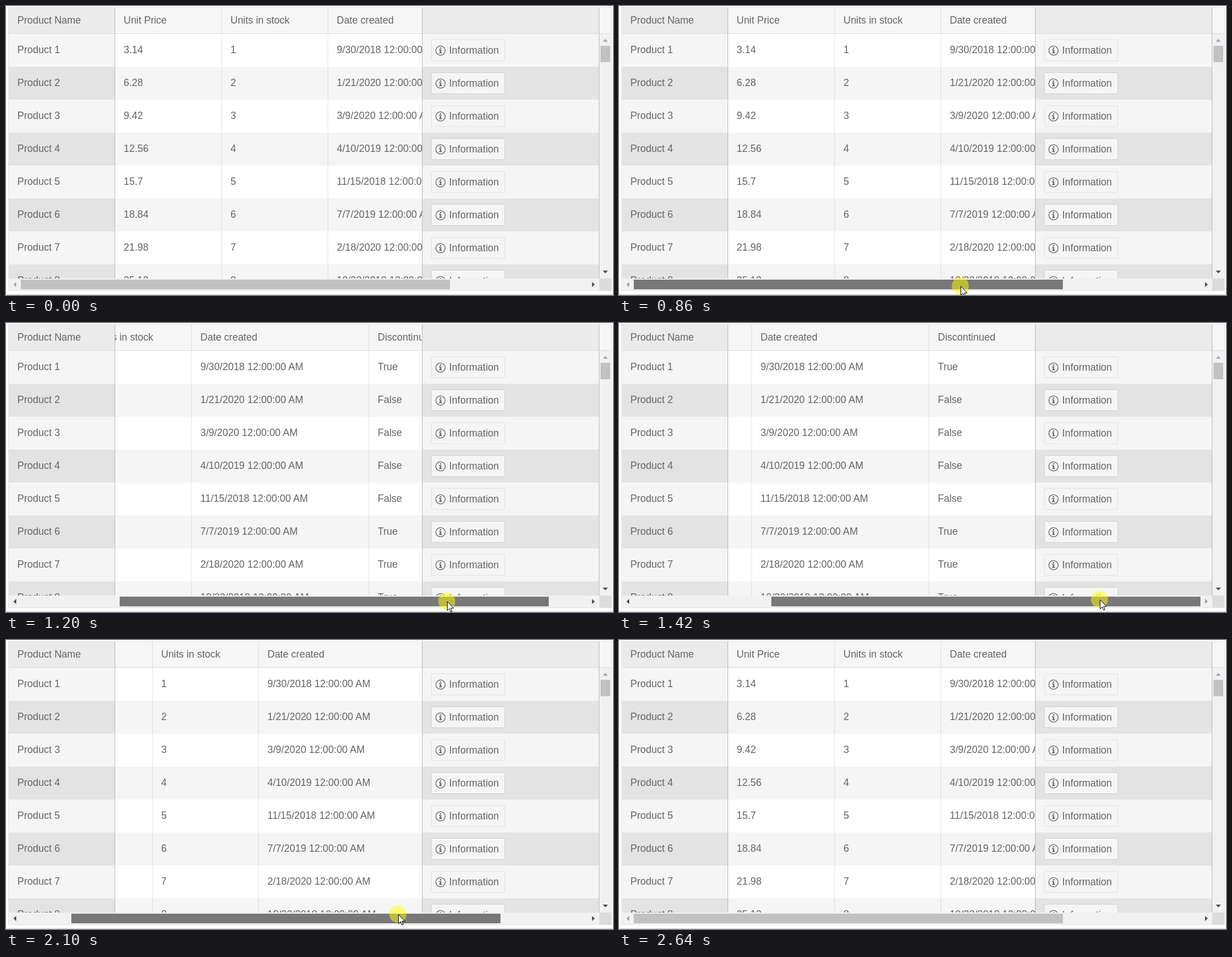
Write an HTML page that moves like this. It is 1068 px wide and 509 px high and loops after 2.73 s.

```html
<!DOCTYPE html>
<html lang="en">
<head>
<meta charset="utf-8">
<title>Grid with locked columns</title>
<style>
  html, body { margin: 0; width: 100%; height: 100%; overflow: hidden; background: #fff; }
  svg { display: block; }
  text { font: 17.5px "Liberation Sans", Arial, sans-serif; fill: #656565; white-space: pre; }
</style>
</head>
<body>
<svg id="stage" width="1068" height="509" viewBox="0 0 1068 509"></svg>
<script>
const LOOP = 2730;
const ROW = 58, BODY_TOP = 49, BODY_BOTTOM = 480;
const MAX_SCROLL = 333, MAX_THUMB = 242, GRAB_X = 601;
const PRESS = 860, RELEASE = 2540, LEAVE = 2640;

const created = ['9/30/2018', '1/21/2020', '3/9/2020', '4/10/2019',
                 '11/15/2018', '7/7/2019', '2/18/2020', '10/22/2018'];
const discontinued = [1, 0, 0, 0, 0, 1, 1, 1];

// Pointer positions, each held until the next: time, x, y
const pointer = [
  [310, 602, 498], [430, 601, 493], [980, 613, 493], [1090, 692, 491],
  [1200, 776, 490], [1320, 817, 488], [1420, 846, 487], [1540, 868, 485],
  [1640, 882, 481], [1760, 891, 478], [1860, 895, 477], [1980, 848, 480],
  [2090, 690, 483], [2200, 592, 478], [2320, 591, 475], [2420, 590, 472]
];

const rect = (x, y, w, h, fill, extra = '') =>
  `<rect x="${x}" y="${y}" width="${w}" height="${h}" fill="${fill}" ${extra}/>`;
const label = (x, y, words) => `<text x="${x}" y="${y}">${words}</text>`;
const arrow = (id, d, fill) => `<path id="${id}" d="${d}" fill="${fill}"/>`;
const eachRow = draw => created.map((_, i) => draw(i, BODY_TOP + i * ROW)).join('');
const stripes = (x, w, odd, even) =>
  eachRow((i, y) => rect(x, y, w, ROW, i % 2 ? even : odd));

const button = y => `<g transform="translate(748 ${y + 10})">
  ${rect(1, 1, 128, 36, '#f5f5f5')}
  <rect x=".5" y=".5" width="129" height="37" rx="1.5" fill="none" stroke="#000" stroke-opacity=".08"/>
  <circle cx="16.5" cy="19.5" r="8.2" fill="none" stroke="#656565" stroke-width="1.3"/>
  <path d="M15.3 14h2.4v2.2h-2.4zM14 17.6h3.7v5.2h1.3v1.4h-5v-1.4h1.4v-3.8H14z" fill="#656565"/>
  ${label(31.7, 25, 'Information')}</g>`;

const lockedLeft = rect(5, 3, 186, 45, '#ebebeb') + stripes(5, 186, '#f5f5f5', '#e3e3e3') +
  label(20, 31, 'Product Name') + eachRow((i, y) => label(20, y + 34, `Product ${i + 1}`));

const lockedRight = rect(733, 3, 310, 45, '#ebebeb') +
  stripes(733, 310, '#f5f5f5', '#e3e3e3') + eachRow((i, y) => button(y));

const columns = [
  [207, 'Unit Price', i => +(3.14 * (i + 1)).toFixed(2)],
  [395, 'Units in stock', i => i + 1],
  [582, 'Date created', i => created[i] + ' 12:00:00 AM'],
  [894, 'Discontinued', i => discontinued[i] ? 'True' : 'False']
].map(([x, title, value]) =>
  label(x, 31, title) + eachRow((i, y) => label(x, y + 34, value(i)))).join('');
const separators = [379, 566, 878].map(x =>
  rect(x, 3, 1, 477, '#000', 'fill-opacity=".1"')).join('');

document.getElementById('stage').innerHTML = `
  <clipPath id="gridClip">${rect(4, 2, 1062, BODY_BOTTOM - 2, '#000')}</clipPath>
  <clipPath id="middleClip">${rect(192, 2, 540, BODY_BOTTOM - 2, '#000')}</clipPath>
  <g clip-path="url(#gridClip)">
    ${rect(192, 3, 540, 45, '#f6f6f6')}
    ${stripes(192, 540, '#fff', '#f5f5f5')}
    <g clip-path="url(#middleClip)"><g id="content">${columns}${separators}</g></g>
    ${lockedLeft}${lockedRight}
    ${rect(1044, 3, 21, 45, '#f6f6f6')}
    ${rect(4, 48, 1062, 1, '#dcdcdc')}
    ${[191, 732, 1043].map(x => rect(x, 3, 1, 477, '#b8b8b8')).join('')}
  </g>
  ${rect(1044, 49, 21, 431, '#f1f1f1')}
  ${rect(1046, 70, 17, 29, '#c1c1c1')}
  ${arrow('up', 'M1050 63h9l-4.5-5z', '#a0abb3')}
  ${arrow('down', 'M1050 466h9l-4.5 5z', '#505050')}
  ${rect(5, 480, 1039, 21, '#f1f1f1')}
  ${rect(1044, 480, 21, 21, '#dcdcdc')}
  ${rect(26, 482, 755, 17, '#c1c1c1', 'id="thumb"')}
  ${arrow('left', 'M18 486v9l-5-4.5z', '#a3a3a3')}
  ${arrow('right', 'M1031 486v9l5-4.5z', '#505050')}
  <rect x="4.5" y="2.5" width="1061" height="499" fill="none" stroke="#e4e4e4"/>
  ${rect(0, 508, 1068, 1, '#c9c9c9')}
  <g id="pointer">
    <circle id="halo" cx="-.5" r="15" fill="#ff0" fill-opacity=".5"/>
    <path d="M.5.5V16.5L4.2 13 6.8 18.8 9 17.8 6.5 12.2H11.5Z" fill="#fff" stroke="#000"/>
  </g>`;

const [content, thumb, left, right, cursor, halo] =
  ['content', 'thumb', 'left', 'right', 'pointer', 'halo'].map(id => document.getElementById(id));
const show = (node, on) => node.setAttribute('visibility', on ? 'visible' : 'hidden');
const paint = (node, color) => node.setAttribute('fill', color);

function render() {
  const t = performance.now() % LOOP;
  const [start, x, y] = pointer.findLast(p => p[0] <= t) || pointer[0];
  const visible = t >= start && t < LEAVE;
  const pressed = t >= PRESS && t < RELEASE;
  const hovered = visible && t < PRESS;
  const drag = pressed ? (x - GRAB_X) * 1.372 : 0;
  const scroll = Math.round(Math.min(MAX_SCROLL, Math.max(0, drag)));

  content.setAttribute('transform', `translate(${-scroll} 0)`);
  thumb.setAttribute('x', 26 + Math.round(scroll * MAX_THUMB / MAX_SCROLL));
  paint(thumb, pressed ? '#787878' : hovered ? '#a8a8a8' : '#c1c1c1');
  paint(left, scroll > 0 ? '#505050' : '#a3a3a3');
  paint(right, scroll < MAX_SCROLL ? '#505050' : '#a3a3a3');
  cursor.setAttribute('transform', `translate(${x} ${y})`);
  show(cursor, visible);
  show(halo, pressed);
  requestAnimationFrame(render);
}
render();
</script>
</body>
</html>
```
